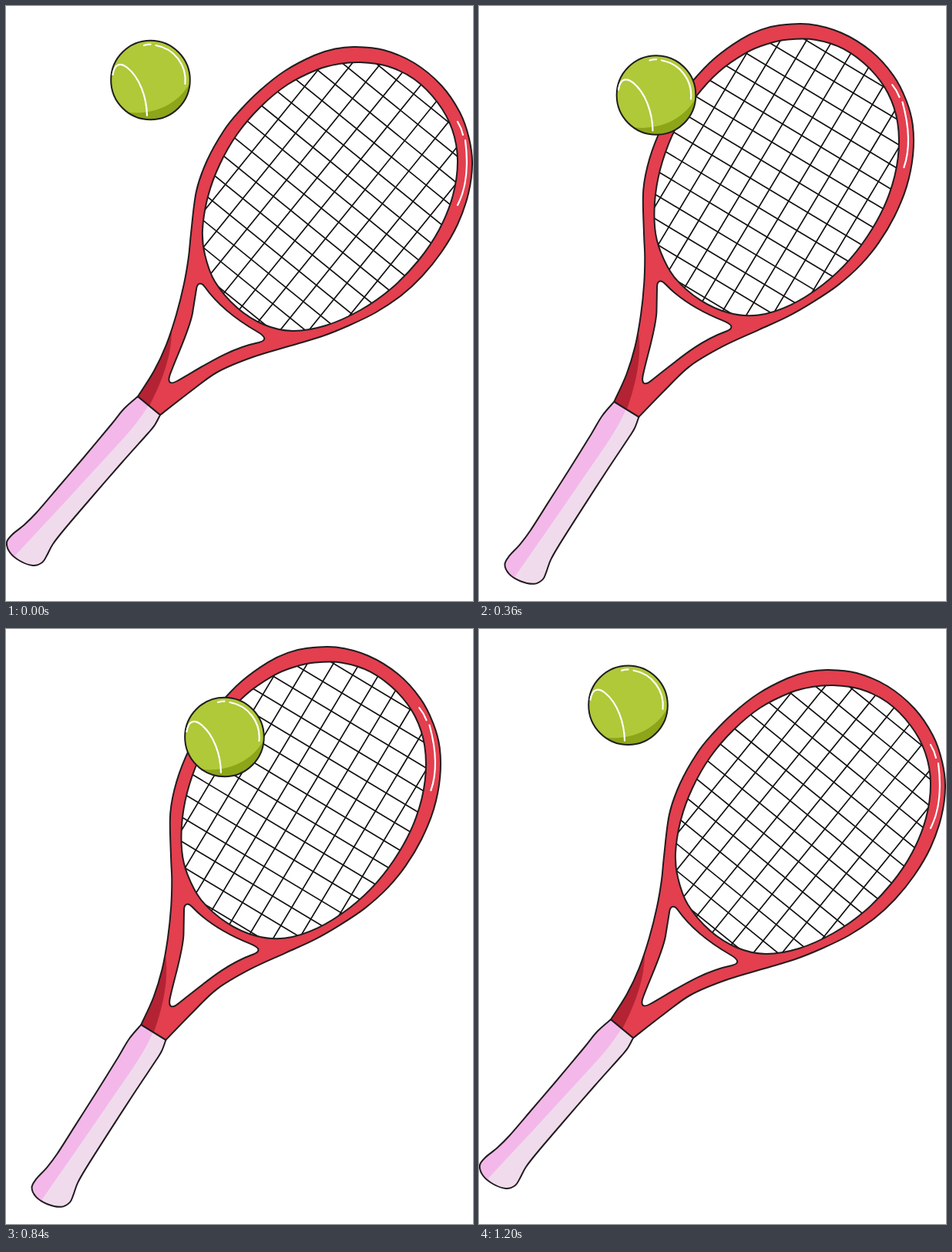
Recreate the animation shown at these times as an HTML page. Size 606x771 px, loop 1.23 s.

```html
<!DOCTYPE html>
<html lang="en">
<head>
<meta charset="utf-8">
<title>Tennis racket and ball</title>
<style>
  html, body { margin: 0; width: 100%; height: 100%; overflow: hidden; background: #fff; }
  svg { display: block; width: 100%; height: 100%; }
  .line { fill: none; stroke: #211c1f; stroke-width: 2; stroke-linejoin: round; stroke-linecap: round; }
  .shine { fill: none; stroke: #fff; stroke-width: 2.2; stroke-linecap: round; }
  #strings { fill: none; stroke: #111; stroke-width: 1.7; }
</style>
</head>
<body>
<svg viewBox="0 0 606 771">
  <defs>
    <clipPath id="bed"><path id="bedShape"/></clipPath>
    <clipPath id="gripClip"><path id="gripShape"/></clipPath>
    <clipPath id="frameClip"><path id="frameShape"/></clipPath>
  </defs>
  <g id="racket">
    <g clip-path="url(#bed)"><path id="strings"/></g>
    <path id="frame" fill="#e33f4e" fill-rule="evenodd"/>
    <path clip-path="url(#frameClip)" fill="#b42333"
      d="M160 506L200 400L215 424C214 455 203 485 186 518Z"/>
    <path id="frameLine" class="line"/>
    <g clip-path="url(#gripClip)">
      <path fill="#f3b8e9" d="M-10 490H210V740H-10Z"/>
      <path fill="#f0dbed" d="M186 516C174 536 160 552 148 565L80 639L12 712L40 750L220 560L210 525Z"/>
    </g>
    <path id="gripLine" class="line"/>
    <path class="shine" d="M586 150Q591 158 593 167M596 174C600 205 598 235 586 258"/>
  </g>
  <g id="ball">
    <circle r="51.3" fill="#afc939"/>
    <path fill="#8ca519" d="M51 4A51.3 51.3 0 0 1 -30 41.5C0 46 34 34 51 4Z"/>
    <circle class="line" r="51.3"/>
    <path class="shine" d="M-49 -7C-47 -20 -40 -24 -30 -16C-14 -3 -5 22 -4.5 46M-8.5 -45Q-4 -46.3 0 -46.3M7 -45A46 46 0 0 1 45 5"/>
  </g>
</svg>
<script>
const $ = id => document.getElementById(id);
const setPath = (id, d) => $(id).setAttribute('d', d);

// Smooth curve through "x,y" points; an open run is closed by a straight edge.
function smooth(text, loop) {
  const p = text.split(' ').map(s => s.split(',').map(Number));
  const n = p.length;
  const at = i => loop ? p[(i + n) % n] : p[Math.max(0, Math.min(n - 1, i))];
  let d = 'M' + p[0];
  for (let i = 0; i < (loop ? n : n - 1); i++) {
    const [a, b, c, e] = [at(i - 1), at(i), at(i + 1), at(i + 2)];
    const c1 = b.map((v, k) => v + (c[k] - a[k]) / 6);
    const c2 = c.map((v, k) => v - (e[k] - b[k]) / 6);
    d += `C${c1} ${c2} ${c}`;
  }
  return d + 'Z';
}

const outer = smooth('171,506 192,473 208,439 221,400 231,360 237,325 240,295 247,240 261,200 283,161 ' +
  '303,136 330,109 362,84 400,64 427,55.5 453,53 490,57 530,74 565,103 589,138 601,172 605,205 600,243 ' +
  '586,283 565,319 540,350 513,375 480,397 445,414 410,428 370,440 320,455 275,474 240,499 200,530');
const inner = smooth('460,73 495,78 530,95 560,125 579,160 586,200 580,245 562,290 535,330 500,366 ' +
  '460,394 415,414 372,421 335,413 300,391 271,357 258,322 255,290 262,247 277,206 300,166 330,131 ' +
  '365,102 405,82 432,75', true);
const throat = 'M247 367C248 359 253 357 258 364C275 388 300 407 326 422C340 430 336 434 328 436' +
  'C290 444 262 463 222 486C213 491 209 488 213 477C223 450 238 420 242 398Z';
const grip = smooth('171,506 153,522 136,543 100,586 70,621 40,656 24,672 8,685 1,695 5,708 18,719 ' +
  '35,725 47,721 53,712 61,697 75,679 110,638 150,592 184,554 193,543 200,530');

setPath('bedShape', inner);
setPath('frameShape', outer);
setPath('frame', outer + inner + throat);
setPath('frameLine', outer + inner + throat);
setPath('gripShape', grip);
setPath('gripLine', grip);

// String grid measured along (u) and across (v) the racket axis from the pivot.
const pivot = [221.8, 479];
const axis = -51 * Math.PI / 180;
const place = (u, v) => [
  (pivot[0] + u * Math.cos(axis) - v * Math.sin(axis)).toFixed(1),
  (pivot[1] + u * Math.sin(axis) + v * Math.cos(axis)).toFixed(1)
];
let grid = '';
for (let k = -4; k <= 4; k++) grid += `M${place(90, 9 + 29 * k)}L${place(520, 9 + 29 * k)}`;
for (let k = 0; k < 14; k++) grid += `M${place(123.4 + 27.2 * k, -170)}L${place(123.4 + 27.2 * k, 190)}`;
setPath('strings', grid);

const LOOP = 1230, STEP = 30;

// Soft start, then arrives at full speed with the given slope; mirrored on the way back.
function swing(t, start, span, slope) {
  const u = Math.max(0, 1 - Math.abs(t - start - span) / span);
  return u * u * (3 - slope - (2 - slope) * u);
}

function draw(t) {
  const turn = -16 * swing(t, 0, 600, 1);
  const hit = swing(t, 84, 606, 1.15);
  $('racket').setAttribute('transform', `rotate(${turn} ${pivot})`);
  $('ball').setAttribute('transform', `translate(${187.5 + 140 * hit} ${96 + 64.2 * hit})`);
}

const begin = performance.now();
function tick() {
  const t = (performance.now() - begin) % LOOP;
  draw(Math.floor(t / STEP) * STEP);
  requestAnimationFrame(tick);
}
tick();
</script>
</body>
</html>
```
